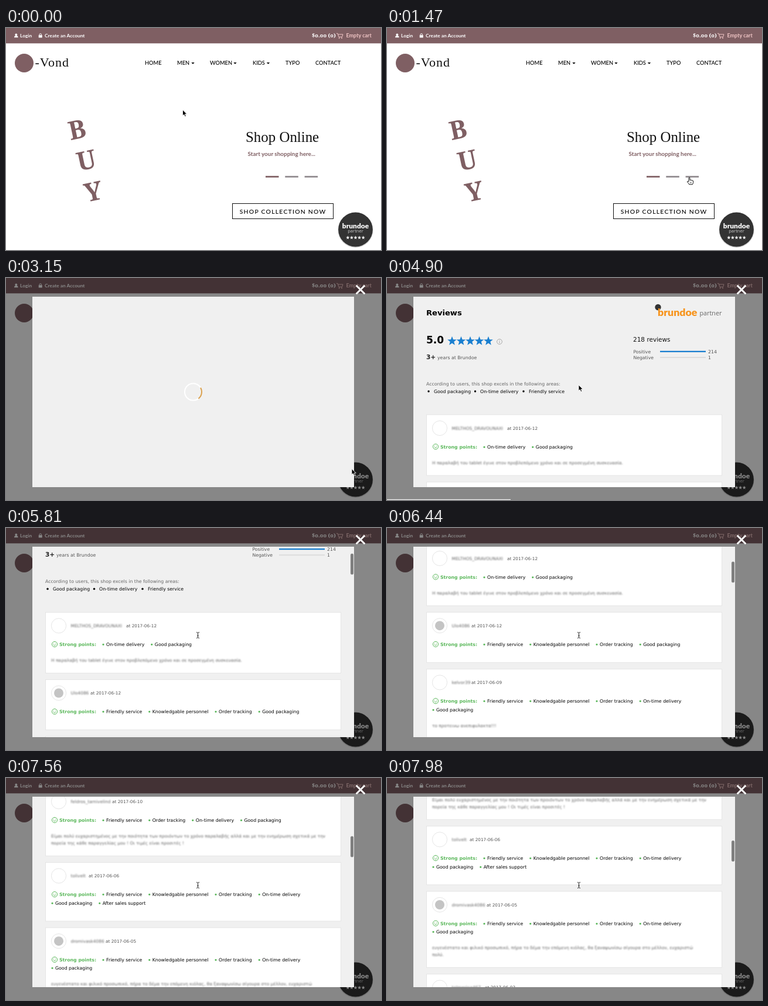
Animation of 640 by 380 pixels, one loop 8 s. Source, as an HTML page:

```html
<!DOCTYPE html>
<html lang="en">
<head>
<meta charset="utf-8">
<title>Review badge</title>
<style>
html, body { margin: 0; width: 100%; height: 100%; overflow: hidden; background: #fff; }
svg { display: block; width: 100vw; height: 100vh; }
text { white-space: pre; font: 7.8px "DejaVu Sans", sans-serif; }
.lato { font-family: Lato, sans-serif; }
.serif { font-family: "Liberation Serif", serif; }
.slab { font-family: "Noto Serif", serif; font-variant-numeric: oldstyle-nums; }
.open { font-family: "Open Sans", sans-serif; }
.blur { filter: blur(.9px); font-size: 7.4px; }
</style>
</head>
<body>
<svg id="stage" viewBox="0 0 640 380" xmlns="http://www.w3.org/2000/svg"></svg>
<script>
const LOOP = 8000, STEP = 70;
const BROWN = '#7f5f63', GREEN = '#5cb85c', BLUE = '#1a7fd0';
const stage = document.getElementById('stage');

// markup helpers
const attrs = o => Object.entries(o).map(([k, v]) => ` ${k}="${v}"`).join('');
const tag = (name, o, body = '') => `<${name}${attrs(o)}>${body}</${name}>`;
const group = (o, ...parts) => tag('g', o, parts.join(''));
const rect = (x, y, width, height, fill, o = {}) => tag('rect', {x, y, width, height, fill, ...o});
const disc = (cx, cy, r, fill, o = {}) => tag('circle', {cx, cy, r, fill, ...o});
const path = (d, o = {}) => tag('path', {d, ...o});
const line = (d, stroke, width, o = {}) =>
  path(d, {fill: 'none', stroke, 'stroke-width': width, ...o});
function text(x, y, str, fill, size, o = {}) {
  const {weight = 400, ls = 0, ...rest} = o;
  const style = `font-size:${size}px;font-weight:${weight};letter-spacing:${ls}px`;
  return tag('text', {x, y, fill, style, ...rest}, str);
}
const lato = (x, y, str, fill, size, o = {}) => text(x, y, str, fill, size, {class: 'lato', ...o});
const serif = (x, y, str, fill, size, o = {}) => text(x, y, str, fill, size, {class: 'serif', ...o});
const slab = (x, y, str, fill, size, o = {}) =>
  text(x, y, str, fill, size, {class: 'slab', weight: 700, ...o});

function star(cx, cy, r, fill) {
  const pts = [];
  for (let i = 0; i < 10; i++) {
    const a = Math.PI * (i / 5 - .5), d = i % 2 ? r * .42 : r;
    pts.push((cx + d * Math.cos(a)).toFixed(2) + ',' + (cy + d * Math.sin(a)).toFixed(2));
  }
  return tag('polygon', {points: pts.join(' '), fill});
}
const stars = (x, y, gap, r, fill) =>
  [0, 1, 2, 3, 4].map(i => star(x + i * gap, y, r, fill)).join('');

function topBar() {
  return rect(0, 0, 640, 26.3, BROWN) +
    disc(17.3, 11.3, 1.9, '#fff') + path('M14 16.3q0-3.2 3.3-3.2t3.3 3.2z', {fill: '#fff'}) +
    lato(24, 16, 'Login', '#fff', 8.4, {weight: 700}) +
    rect(55.7, 12.2, 6, 4.3, '#fff') + line('M57 12.5v-1.2a1.7 1.7 0 0 1 3.4 0v1.2', '#fff', 1) +
    lato(66, 16, 'Create an Account', '#fff', 8.4, {weight: 700}) +
    slab(522, 15.5, '$0.00 (0)', '#fff', 9.6) +
    line('M564 9.3h2l2 6h5.5l1.5-4.4h-8.3', '#f0c5c5', 1) +
    disc(568.7, 17.3, 1, '#f0c5c5') + disc(573, 17.3, 1, '#f0c5c5') +
    lato(580.5, 16, 'Empty cart', '#f0c5c5', 9, {weight: 700});
}

function nav() {
  const items = [[237, 'HOME'], [292, 'MEN', 319], [348, 'WOMEN', 391], [421, 'KIDS', 447.5],
    [477, 'TYPO'], [528, 'CONTACT']];
  return items.map(([x, name, caret]) =>
    lato(x, 63, name, '#000', 9.25, {weight: 500}) +
    (caret ? path(`M${caret - 2.7} 59h5.4l-2.7 2.8z`) : '')).join('');
}

function hero() {
  const letters = [['B', 121.3, 173.7], ['U', 137, 226.3], ['Y', 149, 279.7]];
  return letters.map(([c, x, y]) => slab(0, 15.7, c, BROWN, 44,
      {'text-anchor': 'middle', transform: `translate(${x} ${y}) rotate(-12)`})).join('') +
    serif(409, 195, 'Shop Online', '#111', 24.9) +
    lato(412.5, 219, 'Start your shopping here...', BROWN, 9.95, {weight: 700}) +
    rect(443, 253.2, 22.5, 2.7, BROWN) +
    rect(476.3, 253.2, 22.5, 2.7, '#8f898d') + rect(509.6, 253.2, 22.5, 2.7, '#8f898d') +
    rect(386.5, 300.5, 172, 26, '#fff', {stroke: '#111'}) +
    lato(398.7, 317.6, 'SHOP COLLECTION NOW', '#000', 10.4, {ls: 1.25, weight: 500});
}

function badge() {
  const mid = {'text-anchor': 'middle'};
  return disc(596.5, 346, 30, '#000', {opacity: .15}) + disc(596.5, 345, 29.4, '#333') +
    lato(596.5, 342.6, 'brundoe', '#fff', 12, {weight: 900, ...mid}) +
    text(596.5, 350.2, 'partner', '#ccc', 7.6, {class: 'open', ...mid}) +
    stars(583.3, 358.8, 6.6, 3.2, '#fff');
}

function summary() {
  const dots = [[71, 80, 'Good packaging'], [150.5, 159, 'On-time delivery'],
    [233, 242, 'Friendly service']];
  return text(67, 63.5, 'Reviews', '#000', 13.1, {weight: 700}) +
    disc(462.5, 50, 5.2, '#333') +
    lato(462, 64.5, 'brundoe', '#f7941d', 17.8, {weight: 900}) +
    text(533.5, 64, 'partner', '#666', 10.8, {class: 'open'}) +
    text(67, 112, '5.0', '#000', 17, {weight: 700}) + stars(111, 108, 15.5, 8.2, BLUE) +
    disc(192, 109, 4.4, 'none', {stroke: '#999', 'stroke-width': .8}) +
    line('M192 108.3v3.2M192 106.3v1', '#999', .9) +
    text(67, 139, '3+', '#222', 10.5, {weight: 700}) +
    text(86, 139, 'years at Brundoe', '#555', 7.8) +
    text(420, 109, '218 reviews', '#111', 10.5) +
    text(420.5, 128.7, 'Positive', '#555', 7.7) + text(420.5, 138.8, 'Negative', '#555', 7.7) +
    rect(466, 124.7, 78, 2.3, BLUE) + rect(466, 135, 78, 2, '#dcdcdc') +
    text(548, 128.7, '214', '#555', 7.8) + text(548, 138.8, '1', '#555', 7.8) +
    text(67, 184, 'According to users, this shop excels in the following areas:', '#666', 7.8) +
    dots.map(([d, x, s]) => disc(d, 194, 1.7, '#000') + text(x, 196.7, s, '#000', 7.8)).join('');
}

const FRIENDLY = 'Friendly service', KNOW = 'Knowledgable personnel', TRACK = 'Order tracking',
  TIME = 'On-time delivery', PACK = 'Good packaging', AFTER = 'After sales support';
const reviews = [
  {name: 'MELTHOS_DRAVOUNAXI', dateX: 205, date: '2017-06-12', points: [[TIME, PACK]],
    body: ['Η παραλαβή του tablet έγινε στον προβλεπόμενο χρόνο και σε προσεγμένη συσκευασία.']},
  {name: 'Ulo4086', dateX: 144, date: '2017-06-12', points: [[FRIENDLY, KNOW, TRACK, PACK]],
    body: [], icon: true},
  {name: 'kelvor39', dateX: 144, date: '2017-06-09',
    points: [[FRIENDLY, KNOW, TRACK, TIME], [PACK]], body: ['το προτεινω ανεπιφυλακτα!!!']},
  {name: 'feldros_tamivelind', dateX: 181, date: '2017-06-10',
    points: [[FRIENDLY, TRACK, TIME, PACK]],
    body: ['Είμαι πολύ ευχαριστημένος με την ποιότητα των προιόντων το χρόνο παραλαβής αλλά και με την ενημέρωση σχετικά με την',
      'πορεία της κάθε παραγγελίας μου ! Οι τιμές είναι προσιτές !']},
  {name: 'tolivelt', dateX: 141, date: '2017-06-06',
    points: [[FRIENDLY, KNOW, TRACK, TIME], [PACK, AFTER]], body: []},
  {name: 'dromivask4086', dateX: 170, date: '2017-06-05',
    points: [[FRIENDLY, KNOW, TRACK, TIME], [PACK]], icon: true,
    body: ['ευγενέστατο και φιλικό προσωπικό, πήρα το δέμα την επόμενη κιόλας, θα ξαναψωνίσω σίγουρα στο μέλλον, ευχαριστώ',
      'πολύ.']},
  {name: 'tolmerina467', dateX: 167, date: '2017-06-03', points: [[FRIENDLY, TIME]], body: []}
];

function pointRow(items, x, y) {
  const spans = items.map((s, i) =>
    `<tspan dx="${i ? 9.25 : 0}" dy="1" fill="${GREEN}" style="font-size:11px">•</tspan>` +
    `<tspan dx="1.75" dy="-1">${s}</tspan>`).join('');
  return text(x, y, spans, '#000', 7.8);
}

function card(r, top) {
  const rowY = top + 55, lastRow = rowY + 14.5 * (r.points.length - 1);
  const n = r.body.length;
  const height = lastRow - top + (n ? 49 + 12 * (n - 1) : 31);
  const html = rect(67.5, top, 504, height, '#fff', {stroke: '#e3e3e3', 'stroke-width': .9}) +
    disc(90, top + 23, 12.6, '#fff', {stroke: '#e2e2e2', 'stroke-width': .9}) +
    (r.icon ? disc(90, top + 23, 8, '#c4c4c4') : '') +
    tag('text', {x: 110.5, y: top + 25.7, fill: '#666', class: 'blur'}, r.name) +
    text(r.dateX, top + 25.7, 'at ' + r.date, '#555', 7.3) +
    disc(83, rowY - .3, 4.6, 'none', {stroke: GREEN, 'stroke-width': 1}) +
    line(`M80.6 ${rowY + .3}q2.4 3 4.8 0M81.3 ${rowY - 2}v1M84.7 ${rowY - 2}v1`, GREEN, .9) +
    text(91, rowY + 2.8, 'Strong points:', GREEN, 7.8, {weight: 700}) +
    r.points.map((p, i) => pointRow(p, i ? 75.8 : 162.8, rowY + 2.8 + 14.5 * i)).join('') +
    r.body.map((s, i) => tag('text',
      {x: 77, y: lastRow + 29.8 + 12 * i, fill: '#666', class: 'blur'}, s)).join('');
  return {html, height};
}

function reviewList() {
  let top = 234, html = '';
  for (const r of reviews) {
    const c = card(r, top);
    html += c.html;
    top += c.height + 11.2;
  }
  return html;
}

function loader() {
  return disc(319.5, 195, 14.5, 'none', {stroke: '#fff', 'stroke-width': 2}) +
    group({id: 'arc'}, line('M332 187.7A14.5 14.5 0 0 1 328.4 206.5', '#d9a04e', 2));
}

const outline = {stroke: '#fff', 'stroke-width': .9, 'stroke-linejoin': 'round'};
const cursors =
  group({id: 'arrow'}, path('M0 0V10.2L2.3 8.1 4 11.8 5.8 11 4.2 7.4H7.3Z', {fill: '#000', ...outline})) +
  group({id: 'hand'}, path('M-1 1Q0-.4 1 1V5Q2.3 4 3 5.2 4.2 4.4 5 5.6 6.4 5.2 6.6 6.6V9Q6.4 10.6 5.4 12.3H-.3Q-1.6 10-3.6 7.6-3.6 6-1 7.4Z',
    {fill: '#fff', stroke: '#111', 'stroke-width': 1, 'stroke-linejoin': 'round'}) +
    line('M1.4 7.8v2.6M3.2 7.8v2.6', '#111', .6)) +
  group({id: 'beam'}, line('M-2-4.5Q0-4.5 .5-3.6 1-4.5 3-4.5M.5-3.8V4.8M-2 5.4Q0 5.4 .5 4.5 1 5.4 3 5.4M-.7 1.4h2.4', '#222', 1));

stage.innerHTML =
  '<defs><clipPath id="panelClip"><rect x="45" y="32" width="549" height="326"/></clipPath></defs>' +
  rect(0, 0, 640, 380, '#fff') + topBar() +
  disc(31, 60, 16, BROWN) + serif(49.5, 66, '-Vond', '#111', 22, {ls: 1}) +
  nav() + hero() + badge() +
  group({id: 'modal'},
    rect(0, 0, 640, 380, '#000', {opacity: .47}),
    rect(45, 32, 549, 326, '#f0f0f0'),
    group({id: 'loader'}, loader()),
    group({id: 'content', 'clip-path': 'url(#panelClip)'},
      group({id: 'scroll'}, summary(), reviewList()),
      rect(588, 33, 5, 36, '#7f7f7f', {id: 'thumb', rx: 2.5})),
    line('M597.7 12.7l14.6 14.6M612.3 12.7l-14.6 14.6', '#fff', 3)) +
  rect(0, 378.8, 211, 1.2, '#f2f2f2', {id: 'status'}) +
  group({id: 'cursor'}, cursors);

const el = {};
for (const node of stage.querySelectorAll('[id]')) el[node.id] = node;
const show = (node, on) => node.setAttribute('display', on ? 'inline' : 'none');

const smooth = p => p * p * (3 - 2 * p);
const flick = p => 1 - (1 - p) ** 2;
const linear = p => p;

// keys: [time, ...values, easing into this key]
function track(keys, t) {
  if (t <= keys[0][0]) return keys[0].slice(1);
  for (let i = 1; i < keys.length; i++) {
    const a = keys[i - 1], b = keys[i];
    if (t > b[0]) continue;
    const ease = b[b.length - 1], p = ease((t - a[0]) / (b[0] - a[0]));
    return b.slice(1, -1).map((v, k) => a[k + 1] + (v - a[k + 1]) * p);
  }
  return keys[keys.length - 1].slice(1, -1);
}

const pointer = [[0, 301.5, 140], [630, 455, 205, smooth], [910, 455, 205, linear],
  [1470, 516, 255.5, smooth], [1820, 590, 326.5, smooth], [3700, 590, 326.5, linear],
  [4550, 327, 183, smooth]];
const scrolling = [[5600, 0], [6440, 205, flick], [7000, 409, flick], [7140, 412, linear],
  [7210, 412, linear], [7980, 621, flick]];

function draw(time) {
  const t = Math.floor(time / STEP) * STEP;
  const [x, y] = track(pointer, t);
  const [offset] = track(scrolling, t);
  const loaded = t >= 4200;

  show(el.modal, t >= 2660);
  el.modal.setAttribute('opacity', Math.min(1, Math.max(0, (t - 2590) / 280)));
  show(el.loader, !loaded);
  show(el.content, loaded);
  el.arc.setAttribute('transform', `rotate(${(t - 3150) * .36} 319.5 195)`);
  el.scroll.setAttribute('transform', `translate(0 ${-offset})`);
  show(el.thumb, t > 5600);
  el.thumb.setAttribute('y', 33 + offset * .119);
  show(el.status, loaded && t < 5400);

  const overDash = y > 251 && y < 258 && x > 509 && x < 533;
  const overBadge = t < 2730 && Math.hypot(x - 596.5, y - 345) < 29.4;
  const kind = t >= 5700 ? 'beam' : overDash || overBadge ? 'hand' : 'arrow';
  for (const k of ['arrow', 'hand', 'beam']) show(el[k], k === kind);
  el.cursor.setAttribute('transform', `translate(${x} ${y})`);
}

function tick() {
  draw(performance.now() % LOOP);
  requestAnimationFrame(tick);
}
tick();
</script>
</body>
</html>
```
